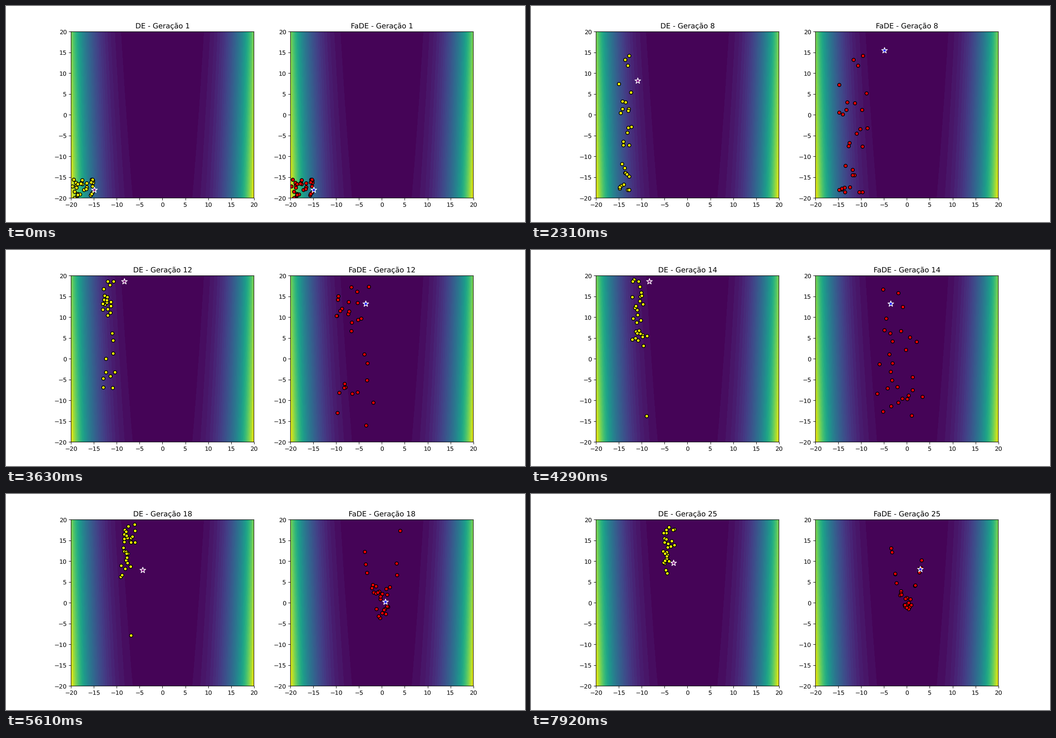
A matplotlib script that plays this animation: 1159x483 px, repeating every 8 s.

```python
import numpy as np
import matplotlib.pyplot as plt
from matplotlib.animation import FuncAnimation

WIDTH, HEIGHT, DPI = 1159, 483, 96.6
LOOP, STEP, TICK = 8000, 330, 50   # ms
DOTS, GENERATIONS = 29, 25
KEYS = (1, 5, 10, 14, 18, 25)      # generations at which the cloud is described

plt.rcParams["text.hinting"] = "none"


class Swarm:
    """Dots that search inside a drifting cloud.

    mid, half: centre and half width of the cloud in x
    low, high: its range in y, measured from valley * x ** 2
    skew: above 1, the dots crowd near the low end
    strays: share of jumps that land far below the cloud
    best: (first generation, x, y) for each leading position
    """

    def __init__(self, mid, half, low, high, skew, valley, best, strays=0):
        self.shape = np.array([mid, half, low, high, skew, valley])
        self.best_steps = best
        self.strays = strays
        self.rng = np.random.default_rng(12)
        dots = self.sample(self.cloud(1))
        self.history = [dots]
        for gen in range(2, GENERATIONS + 1):
            cloud = self.cloud(gen)
            # Dots left behind must jump; the others do so now and then.
            jump = ~self.inside(dots, cloud) | (self.rng.random(DOTS) < 0.3)
            dots = np.where(jump[:, None], self.sample(cloud, gen), dots)
            self.history.append(dots)

    def cloud(self, gen):
        return [np.interp(gen, KEYS, row) for row in self.shape]

    def sample(self, cloud, gen=1):
        mid, half, low, high, skew, valley = cloud
        u = self.rng.uniform(-1, 1, DOTS)
        v = self.rng.random(DOTS)
        x = mid + half * np.sign(u) * np.abs(u) ** (1 + 0.6 * valley)
        y = low + (high - low) * v ** skew + valley * x ** 2
        if gen > 10:
            stray = self.rng.random(DOTS) < self.strays
            y = np.where(stray, -20 * v, y)
        return np.column_stack([x, y])

    @staticmethod
    def inside(dots, cloud):
        mid, half, low, high, _, valley = cloud
        x, y = dots.T
        rise = y - valley * x ** 2
        return (np.abs(x - mid) <= half) & (low <= rise) & (rise <= high)

    def dots(self, gen):
        return self.history[gen - 1]

    def best(self, gen):
        return [step[1:] for step in self.best_steps if step[0] <= gen][-1]


de = Swarm(
    mid=(-17.4, -15.1, -12.7, -10.5, -7.6, -4),
    half=(2.4, 1.3, 1.5, 1.6, 1.6, 1.3),
    low=(-20, -19.5, -17, 3, 6, 7),
    high=(-15.3, 8, 19, 19.3, 19, 19),
    skew=(1, 5, 1, 1, 1, 1),
    valley=(0, 0, 0, 0, 0, 0),
    best=[(1, -14.9, -18), (4, -13.55, -17.4), (8, -10.9, 8.25),
          (12, -8.4, 18.65), (16, -4.4, 7.95), (20, -3.05, 9.6)],
    strays=0.06)

fade = Swarm(
    mid=(-17.4, -15.1, -9.5, -1.6, 0, 0),
    half=(2.4, 1.5, 4.5, 5, 4, 3.6),
    low=(-20, -19.5, -18, -14, -5, -2),
    high=(-15.3, 8, 19, 17, 2.5, 1.5),
    skew=(1, 5, 1, 1, 1, 1),
    valley=(0, 0, 0, 0, 1, 1),
    best=[(1, -14.9, -18), (4, -12.7, -3.9), (8, -4.95, 15.55),
          (12, -3.6, 13.25), (16, 0.75, 0.25), (24, 2.9, 8.15)])


class Panel:
    def __init__(self, ax, name, swarm, dot_color, star_color):
        self.ax, self.name, self.swarm = ax, name, swarm
        side = np.linspace(-20, 20, 200)
        x, y = np.meshgrid(side, side)
        cost = 100 * (y - x ** 2) ** 2 + (1 - x) ** 2
        ax.contourf(x, y, cost, levels=50, cmap="viridis")
        ax.set(xlim=(-20, 20), ylim=(-20, 20),
               xticks=range(-20, 21, 5), yticks=range(-20, 21, 5))
        for spine in ax.spines.values():
            spine.set_snap(False)
        self.dots = ax.scatter([], [], s=30, c=dot_color,
                               edgecolors="black", linewidths=1.2)
        self.star = ax.scatter([], [], s=100, marker="*", c=star_color,
                               edgecolors="white", linewidths=1.1)

    def show(self, gen):
        self.dots.set_offsets(self.swarm.dots(gen))
        self.star.set_offsets([self.swarm.best(gen)])
        self.ax.set_title(f"{self.name} - Geração {gen}")


# The tiny surplus keeps the pixel size from rounding down.
fig, (left, right) = plt.subplots(
    1, 2, figsize=((WIDTH + 1e-3) / DPI, (HEIGHT + 1e-3) / DPI), dpi=DPI)
dx, dy = 0.48 / WIDTH, 0.48 / HEIGHT   # half a pixel right and up
fig.subplots_adjust(left=0.125 + dx, right=0.9 + dx,
                    bottom=0.11 + dy, top=0.88 + dy)
panels = [Panel(left, "DE", de, "yellow", "purple"),
          Panel(right, "FaDE", fade, "red", "blue")]


def update(i):
    gen = (i * TICK + TICK - 1) // STEP + 1
    for panel in panels:
        panel.show(min(gen, GENERATIONS))
    return []


anim = FuncAnimation(fig, update, frames=LOOP // TICK, interval=TICK,
                     repeat=True, repeat_delay=0, blit=False)
plt.show()
```
